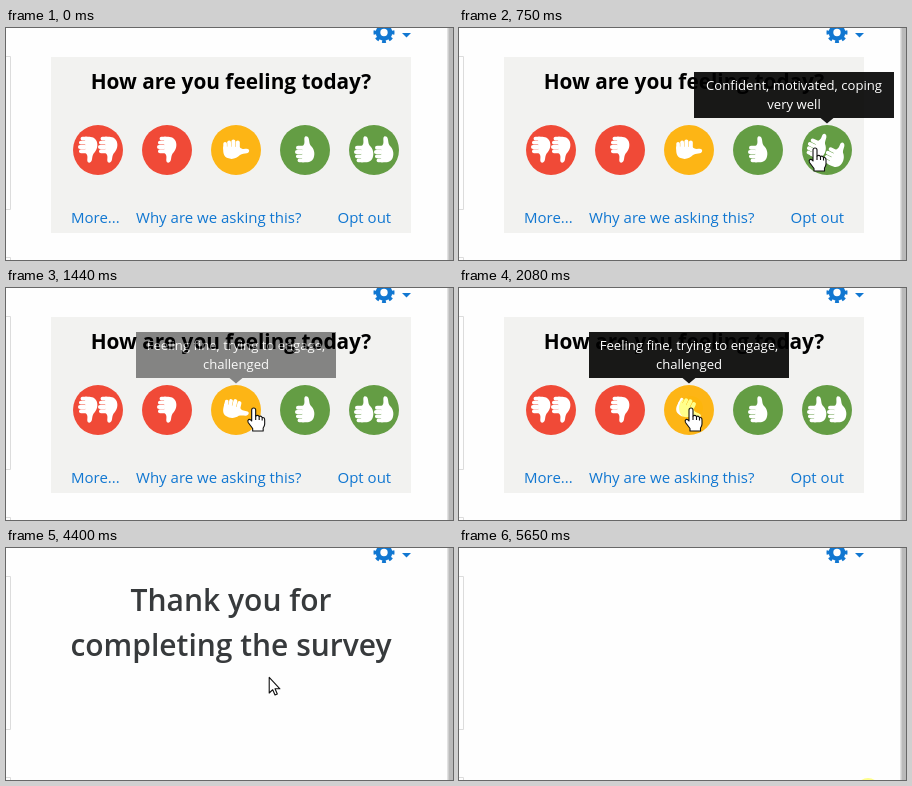
Recreate the animation shown at these times as an HTML page. Size 447x232 px, loop 5.73 s.

```html
<!DOCTYPE html>
<html lang="en">
<head>
<meta charset="utf-8">
<title>How are you feeling today?</title>
<style>
html, body { margin: 0; width: 100%; height: 100%; overflow: hidden; background: #fefefe; }
svg { display: block; width: 447px; height: 232px; font-family: "Open Sans", sans-serif; }
.title { font-size: 20.8px; font-weight: 700; text-anchor: middle; }
.links { font-size: 15px; fill: #1177d1; }
.tip { opacity: 0; }
.tip text { font-size: 13.125px; fill: #fff; text-anchor: middle; }
.tip path { fill: #000; fill-opacity: .9; }
.thumbs { fill: #fff; }
.thanks { font-size: 30px; font-weight: 600; fill: #373a3c; text-anchor: middle; }
.cursor path { fill: #fff; stroke: #111; stroke-width: 1.1; stroke-linejoin: round; }
.cursor .lines { fill: none; }
#halo { fill: #ffff8c; mix-blend-mode: multiply; }
</style>
</head>
<body>
<svg viewBox="0 0 447 232">
  <defs>
    <g id="thumb">
      <path d="M-2.5-3.5C.6-6-1-9-.6-11.6C-.2-14 3-13.6 3.8-10.8C4.4-8.4 4.2-6.2 5.6-4C9-1 10.4 4 8.6 8.4C7 12 4 12.8 0 12.8H-3Z"/>
      <rect x="-9" y="-3.8" width="9" height="4" rx="2"/>
      <rect x="-10" y=".6" width="9" height="4" rx="2"/>
      <rect x="-9" y="5" width="9" height="3.7" rx="1.8"/>
      <rect x="-7.4" y="9.1" width="8" height="3.6" rx="1.7"/>
    </g>
  </defs>

  <path d="M0 28.5H4.5V181.5H0M0 229.5H4.5V232" fill="none" stroke="#dcdcdc"/>
  <rect x="441" width="6" height="232" fill="#e2e2e2"/>
  <rect x="442.5" width="4.5" height="232" fill="#bababa"/>
  <g fill="none" stroke="#1177d1">
    <circle cx="378" cy="4.5" r="6" stroke-width="4.6"/>
    <circle cx="378" cy="4.5" r="8.8" stroke-width="3.4" pathLength="16" stroke-dasharray="1.1 .9" stroke-dashoffset=".55"/>
  </g>
  <path d="M396 5h9l-4.5 4.5z" fill="#1177d1"/>

  <g id="panel">
    <rect x="45" y="29" width="360" height="176" fill="#f2f2f0"/>
    <text class="title" x="225" y="61">How are you feeling today?</text>
    <g id="faces"></g>
    <g class="links">
      <text x="65" y="195">More...</text>
      <text x="130" y="195">Why are we asking this?</text>
      <text x="331.5" y="195">Opt out</text>
    </g>
    <g id="tips"></g>
  </g>

  <g id="thanks" class="thanks">
    <text x="225" y="63">Thank you for</text>
    <text x="225" y="108">completing the survey</text>
  </g>

  <circle id="halo" r="12"/>
  <g id="cursor" class="cursor">
    <g id="hand">
      <path d="M-2 2Q-2 0 0 0T2 2V8Q4 6.5 5.5 8.5 7.5 7.5 8.5 9.5 11 9 11 12V16Q11 18 9.5 20V23H-1V20.5L-5.5 14.5Q-6.5 12.5-5 11.5-3.5 11-2 13Z"/>
      <path class="lines" d="M2 8v4M5.5 8.5v3.5M8.5 9.5v3"/>
    </g>
    <path id="arrow" d="M.5 .5V16.2L4 12.9 6.3 18.2 8.6 17.2 6.3 12H11.2Z"/>
  </g>
</svg>
<script>
const LOOP = 5730, TICK = 76.6;
const ENTER = 290, CLICK = 2080, SENT = 2310, DONE = 2540, LEAVE = 4400, REPLAY = 5650;
const $ = id => document.getElementById(id);
const faceX = i => 92 + 69 * i;

const RED = '#f04a37', YELLOW = '#fdb515', GREEN = '#649d44';
const UP = '', DOWN = 'scale(1 -1)', SIDE = 'rotate(90)';
const faces = [
  [RED, DOWN, [-10, 10]], [RED, DOWN, [0]], [YELLOW, SIDE, [0]], [GREEN, UP, [0]], [GREEN, UP, [-10, 10]]
];
$('faces').innerHTML = faces.map(([color, pose, places], i) => `
  <g transform="translate(${faceX(i)} 122)">
    <circle r="25" fill="${color}"/>
    <g id="face${i}" class="thumbs">${places.map(x =>
      `<use href="#thumb" transform="translate(${x} -.5) ${pose}"/>`).join('')}</g>
  </g>`).join('');

const tips = [
  { face: 4, x: 235, from: 595, to: 1150, lines: ['Confident, motivated, coping', 'very well'] },
  { face: 3, x: 198, from: 1220, to: 1370, lines: ['Engaged and challenged,', 'progressing well overall'] },
  { face: 2, x: 130, from: 1450, to: LOOP, lines: ['Feeling fine, trying to engage,', 'challenged'] }
];
$('tips').innerHTML = tips.map(({ face, x, lines }) => `
  <g id="tip${face}" class="tip">
    <path d="M${x} 44h200v46H${faceX(face) + 6.5}l-6.5 5.5l-6.5 -5.5H${x}z"/>
    ${lines.map((line, i) => `<text x="${x + 100}" y="${62 + 19 * i}">${line}</text>`).join('')}
  </g>`).join('');

// Progress from 0 to 1 in whole ticks; the first step lands on start, the last on end.
function stepped(t, start, end) {
  const step = Math.floor((t - start) / TICK + .15) + 1;
  const count = Math.round((end - start) / TICK) + 1;
  return Math.min(1, Math.max(0, step / count));
}
const easeOut = (p, power) => 1 - (1 - p) ** power;
const show = (id, opacity) => { $(id).style.opacity = Number(opacity); };
const place = (id, x, y) => $(id).setAttribute('transform', `translate(${x} ${y})`);

function cursorAt(t) {
  const enter = easeOut(stepped(t, ENTER, 750), 2);
  const cross = easeOut(stepped(t, 1070, 1610), 2.3);
  const settle = stepped(t, 1760, 1760);
  const leave = stepped(t, LEAVE, 4860);
  return [
    418 - 62 * enter - 121 * cross - 3 * settle + 177 * leave ** .9,
    230 - 110 * enter + 122 * leave ** 1.35
  ];
}

function draw(t) {
  let hovering = false;
  for (const { face, from, to } of tips) {
    const hover = stepped(t, from, from + TICK) - stepped(t, to, to + TICK);
    hovering ||= hover > 0;
    show('tip' + face, t < SENT ? hover : 0);
    $('face' + face).setAttribute('transform', `rotate(${26 * hover})`);
  }
  const pointing = hovering && t < DONE;
  const [x, y] = cursorAt(t);
  place('cursor', x, y);
  place('halo', x, y);
  show('cursor', t >= ENTER);
  show('hand', pointing);
  show('arrow', !pointing);
  show('halo', t >= CLICK && t < SENT || t >= REPLAY);
  show('faces', t < SENT ? 1 : .5);
  show('panel', t < DONE);
  show('thanks', t < DONE ? 0 : 1 - stepped(t, 4630, 4860));
}

const began = performance.now();
function frame() {
  draw((performance.now() - began) % LOOP);
  requestAnimationFrame(frame);
}
frame();
</script>
</body>
</html>
```
